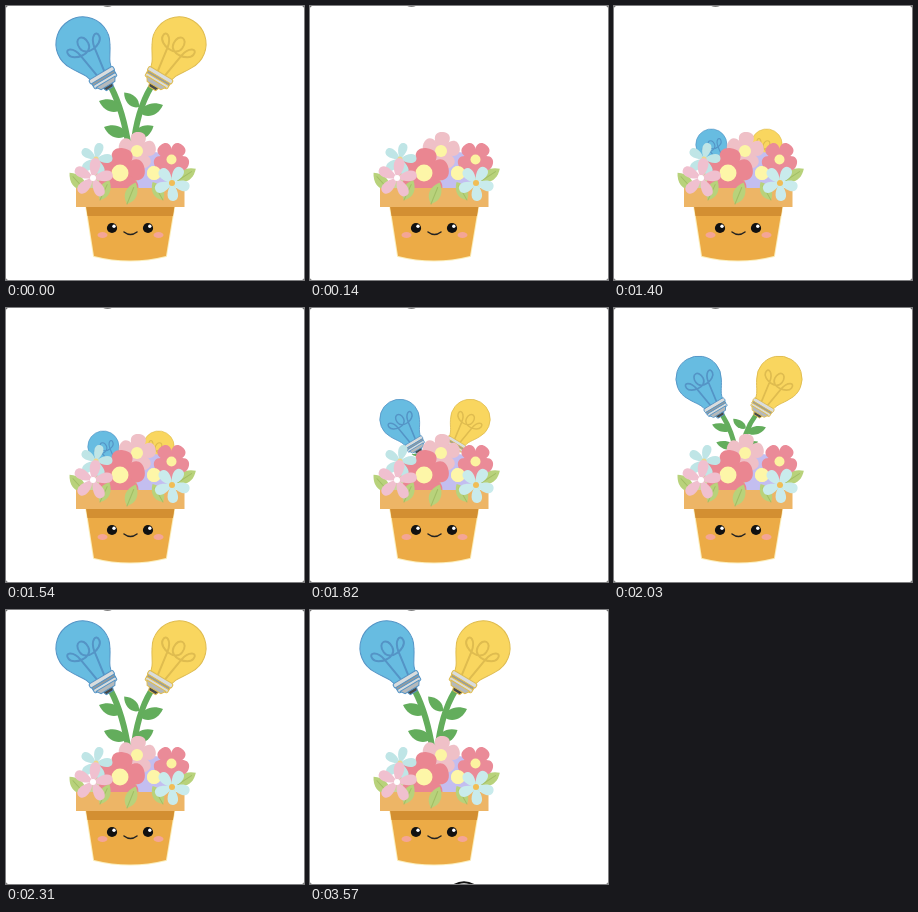
Write an HTML page that moves like this. It is 298x274 px and loops after 3640 ms.

```html
<!DOCTYPE html>
<html>
<head>
<meta charset="utf-8">
<style>
html, body { margin: 0; width: 100%; height: 100%; overflow: hidden; background: #555; }
svg { display: block; width: 100vw; height: 100vh; }
</style>
</head>
<body>
<svg viewBox="0 0 298 274" fill="none" stroke-linecap="round">
  <defs>
    <g id="bulb">
      <path d="M-12 38C-12 28-18 24-23 14A27 27 0 1 1 23 14C18 24 12 28 12 38Z" fill="currentColor"/>
      <path d="M-4 36L-8 9C-10-3-19-6-18 2C-17 10 4 14 5 2C6-10-6-10-5 2C-4 14 17 10 18 2C19-6 10-3 8 9L4 36" stroke-width="2"/>
      <path d="M-6 47H6L4 52H-4Z" fill="#484a4a"/>
      <rect x="-14" y="34" width="28" height="5" rx="2" fill="#d9dcdd"/>
      <rect x="-13" y="38.500" width="26" height="3" fill="#979b9d"/>
      <rect x="-13" y="41" width="26" height="4" rx="1.500" fill="#d9dcdd"/>
      <path d="M-11 44H11L8 48.500H-8Z" fill="#b5b9bb"/>
    </g>
    <path id="leaf" d="M0 0C-3-9-13-12-23-8C-18 3-7 6 0 0Z"/>
  </defs>
  <rect width="298" height="274" rx="2.500" fill="#fff"/>
  <ellipse cx="101.500" cy="-1.500" rx="5" ry="2.300" fill="#555"/>

  <g id="stems">
    <path d="M105 81Q117 104 123 142M145 81Q131 104 127 142" stroke="#63ad5c" stroke-width="6" stroke-linecap="butt"/>
    <g fill="#63ad5c">
      <use href="#leaf" transform="translate(116 103)"/>
      <use href="#leaf" transform="translate(121 129)"/>
      <use href="#leaf" transform="translate(133 101) rotate(25) scale(.85)"/>
      <use href="#leaf" transform="translate(134 107) scale(-1 1)"/>
      <use href="#leaf" transform="translate(127 131) rotate(-8) scale(-.95 1)"/>
    </g>
  </g>
  <g id="bulbs">
    <use href="#bulb" color="#67bce1" stroke="#5494c6" transform="translate(77 38) rotate(-31)"/>
    <use href="#bulb" color="#f9d65f" stroke="#dfbc4f" transform="translate(173 38) rotate(31)"/>
  </g>

  <g id="can">
    <path d="M219 19L268 43C266 64 253 86 240 92Q228 97 217 90Z" fill="#eee"/>
    <path d="M223 20C232 4 245 2 256 8C268 15 273 28 261 41" stroke="#f18790" stroke-width="5"/>
    <path d="M217 17L266 41C264 62 250 84 238 91C225 98 215 93 207 81L185 54Z" fill="#f17e87"/>
    <path d="M217 17L221 19L189 58L185 54Z" fill="#e3858b"/>
    <path d="M196 66C187 72 177 74 168 76L153 74C150 79 153 89 160 93L170 82C182 80 195 80 208 80Z" fill="#f17e87"/>
    <path d="M153 74C150 79 153 89 160 93C162 86 159 78 153 74Z" fill="#e2727b"/>
    <path d="M229 63C220 60 214 54 218 49C221 46 225 47 227 49C228 44 234 43 236 47C238 53 234 59 229 63Z" fill="#f49ba1"/>
    <g id="drops" stroke="#68cdd0" stroke-width="1.300"></g>
  </g>

  <g id="back"></g>
  <path d="M80 199H168.500L160 250Q124 259 88 250Z" fill="#ecab46" stroke="#fbeebc" stroke-width="2" paint-order="stroke"/>
  <path d="M80 200H168.500L167 210H81.500Z" fill="#d38f32"/>
  <path d="M70 182H178.500V201H70Z" fill="#edb566"/>
  <g fill="#f4a596">
    <ellipse cx="96.500" cy="229" rx="5" ry="3"/>
    <ellipse cx="152.500" cy="229" rx="5" ry="3"/>
  </g>
  <g fill="#111">
    <circle cx="106" cy="222" r="5.100"/>
    <circle cx="142" cy="222" r="5.100"/>
  </g>
  <g fill="#fff">
    <circle cx="108" cy="220.300" r="1.700"/>
    <circle cx="143.800" cy="220.300" r="1.700"/>
  </g>
  <path d="M118 226Q124.500 231 131 226" stroke="#222" stroke-width="1.500"/>
  <g id="front"></g>

  <path id="arc" d="M144 275Q154 269.500 164 275" stroke="#111" stroke-width="2"/>
</svg>
<script>
const $ = id => document.getElementById(id);

// One flower: rounded petals around a centre
function flower(x, y, length, width, turn, color, core, coreR) {
  let s = `<g transform="translate(${x} ${y})" fill="${color}">`;
  for (let i = 0; i < 5; i++)
    s += `<path transform="rotate(${turn + i * 72})"
      d="M0 0C${-width} ${-length * .45} ${-width} ${-length} 0 ${-length}S${width} ${-length * .45} 0 0Z"/>`;
  return s + `<circle r="${coreR}" fill="${core}"/></g>`;
}

const leaf = (x, y, turn, size = 1) =>
  `<g transform="translate(${x} ${y}) rotate(${turn}) scale(${size})">
    <path d="M0 0C-8-6-7-15 0-22C7-15 8-6 0 0Z" fill="#b8d27b"/>
    <path d="M0 0V-17" stroke="#a2be65"/></g>`;

$('back').innerHTML =
  leaf(79, 184, -42, 1.05) + leaf(171, 175, 57, 1.02) +
  '<path d="M80 184Q82 168 100 160H152Q168 166 170 184Z" fill="#c7d79a"/>' +
  flower(148, 167, 21, 13, 0, '#c3bef0', '#fdf6a8', 7) +
  flower(131, 145, 19, 10, 6, '#efc0c7', '#fcf5a4', 6) +
  flower(165.5, 153.5, 18, 9.5, 36, '#ea8b98', '#fcf3a0', 5) +
  flower(114, 167, 25, 14, 7, '#ea8691', '#fdf6a8', 8.5) +
  flower(90, 153, 16.5, 6, 15, '#bfe5e6', '#f0d68a', 2.5) +
  '<circle cx="148" cy="167" r="7" fill="#fdf6a8"/>';

$('front').innerHTML =
  leaf(94, 194, 25) + leaf(121, 198, 22, 1.05) + leaf(157, 194, -30, .95) +
  flower(87, 172, 20, 7, 9, '#f0c0cf', '#fff', 3) +
  flower(166, 177, 18, 7, 32, '#c9ebec', '#f1bd55', 3);

const drops = [[114, 100], [125, 90], [127, 83], [131, 96], [134, 88], [137, 82], [139, 105], [128, 113],
  [141, 101], [144, 94], [143, 83], [147, 88], [151, 95], [150, 115], [149, 101]];
$('drops').innerHTML = drops.map(([x, y]) => {
  const lean = (150 - x) / 14;
  return `<path d="M${x + lean / 2} ${y - 1}l${-lean} 2"/>`;
}).join('');

// Start time, bulb scale, bulb vertical shift
const stages = [[0, 1, 0], [70, 0, 0], [1400, .575, 116.7], [1750, .735, 83.3], [1960, .84, 39], [2240, 1, 0]];
const root = 162, tip = 81;

function show(id, on) {
  $(id).style.display = on ? '' : 'none';
}

function draw(now) {
  const t = now % 3640;
  const [, size, drop] = stages.findLast(s => t >= s[0]);
  // Stems stretch from the soil up to the bulbs
  const reach = (root - tip * size - drop) / (root - tip);
  const left = 125 * (1 - size);
  show('bulbs', size);
  show('stems', size && reach > 0);
  $('bulbs').setAttribute('transform', `translate(${left} ${drop}) scale(${size})`);
  $('stems').setAttribute('transform', `translate(${left} ${root * (1 - reach)}) scale(${size} ${reach})`);
  show('can', t >= 910 && t < 1400);
  show('arc', t >= 3570);
}

const start = performance.now();
function tick() {
  draw(performance.now() - start);
  requestAnimationFrame(tick);
}
tick();
</script>
</body>
</html>
```
